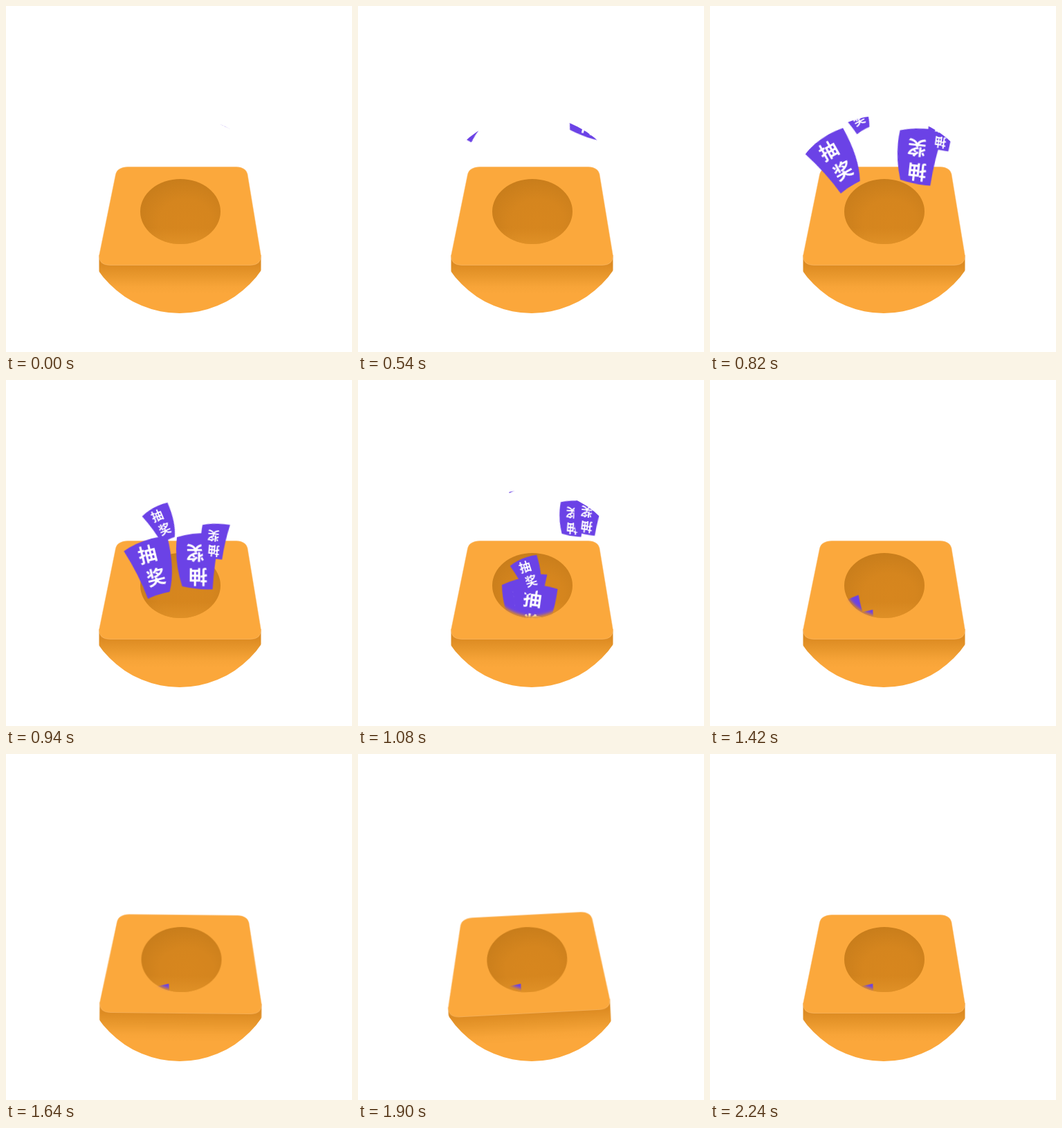
An HTML page that plays this animation: 500x500 px, repeating every 3.26 s.

```html
<!DOCTYPE html>
<html lang="zh-CN">
<head>
<meta charset="utf-8">
<title>抽奖</title>
<style>
html, body { margin: 0; width: 100%; height: 100%; overflow: hidden; background: #fff; }
svg { display: block; width: 100vw; height: 100vh; }
text {
  font: 700 27px "Noto Sans CJK SC", "Noto Sans CJK", sans-serif;
  fill: #fff;
  text-anchor: middle;
}
.box { transform-origin: 251px 444px; animation: sway 3260ms infinite; }
.fall {
  animation: 3260ms infinite;
  animation-timing-function: cubic-bezier(.333, .107, .667, .44);
}
.big { animation-name: big; }
.small { animation-name: small; }
.late { animation-name: late; }
.last { animation-name: last; }

/* Each ticket drops from pose --a to pose --b */
@keyframes big { 0%, 14.72% { transform: var(--a); } 36.2%, 100% { transform: var(--b); } }
@keyframes small { 0%, 17.18% { transform: var(--a); } 40.49%, 100% { transform: var(--b); } }
@keyframes late { 0%, 26.38% { transform: var(--a); } 44.79%, 100% { transform: var(--b); } }
@keyframes last { 0%, 32.52% { transform: var(--a); } 42.94%, 100% { transform: var(--b); } }

/* Two full sine swings */
@keyframes sway {
  0% { transform: rotate(0deg); }
  43.74% { transform: rotate(0deg); animation-timing-function: cubic-bezier(.39, .575, .565, 1); }
  46.87%, 59.39% { transform: rotate(-3.5deg); animation-timing-function: cubic-bezier(.364, 0, .636, 1); }
  53.13% { transform: rotate(3.5deg); animation-timing-function: cubic-bezier(.364, 0, .636, 1); }
  65.64% { transform: rotate(3.5deg); animation-timing-function: cubic-bezier(.47, 0, .745, .715); }
  68.71%, 100% { transform: rotate(0deg); }
}
</style>
</head>
<body>
<svg viewBox="0 0 500 500">
  <defs>
    <clipPath id="disc"><circle cx="251" cy="301" r="143"/></clipPath>
    <linearGradient id="front" gradientUnits="userSpaceOnUse" x1="0" y1="374" x2="0" y2="416">
      <stop offset="0" stop-color="#dd8b22"/>
      <stop offset=".35" stop-color="#e8972c"/>
      <stop offset=".75" stop-color="#f7a438"/>
      <stop offset="1" stop-color="#fba73b"/>
    </linearGradient>
    <radialGradient id="hollow" cx=".56" cy=".64" r=".66">
      <stop offset="0" stop-color="#d7861e"/>
      <stop offset=".5" stop-color="#d5851e"/>
      <stop offset="1" stop-color="#c87d1b"/>
    </radialGradient>
    <linearGradient id="lip" x1="0" y1="0" x2="0" y2="1">
      <stop offset=".75" stop-color="#e39429" stop-opacity="0"/>
      <stop offset="1" stop-color="#e39429" stop-opacity=".75"/>
    </linearGradient>
    <filter id="soft"><feGaussianBlur stdDeviation="2"/></filter>
    <mask id="mouth" maskUnits="userSpaceOnUse" x="0" y="0" width="500" height="500">
      <rect width="500" height="297" fill="#fff"/>
      <ellipse cx="252" cy="295" rx="57" ry="46" fill="#fff" filter="url(#soft)"/>
    </mask>
    <g id="words">
      <text x="-1" y="-12">抽</text>
      <text x="3" y="23">奖</text>
    </g>
    <g id="left">
      <path fill="#6b42e6" d="M-33-35Q-2-47 33-41Q33 8 17 38Q0 37-16 40Q-20 4-33-35Z"/>
      <use href="#words"/>
    </g>
    <g id="right">
      <path fill="#6b42e6" d="M-30-35Q-4-43 33-41Q24 0 22 40Q0 41-22 36Q-34 0-30-35Z"/>
      <use href="#words" transform="rotate(180)"/>
    </g>
  </defs>

  <g clip-path="url(#disc)">
    <g class="box">
      <path fill="url(#front)" d="M134.5 360V480H368.5V360Z"/>
      <path fill="#fba83c" stroke="#fcc27a" stroke-width=".8" stroke-opacity=".6"
        d="M176 232.5H333Q346.5 233 349 243L368.3 360Q369 374.5 353 374.5H150Q134 374.5 134.7 360L158.5 243Q161 233 176 232.5Z"/>
      <ellipse cx="252" cy="297" rx="58" ry="47" fill="url(#hollow)"/>
      <ellipse cx="252" cy="297" rx="58" ry="47" fill="url(#lip)"/>
    </g>

    <g mask="url(#mouth)">
      <g class="fall big" style="--a:translate(341px,142px) rotate(16deg); --b:translate(214px,380px) rotate(-15deg)">
        <use href="#right"/>
      </g>
      <g class="fall small" style="--a:translate(379px,116px) rotate(11deg) scale(.63); --b:translate(143px,469px) rotate(-6deg) scale(.63)">
        <use href="#right"/>
      </g>
      <g class="fall big" style="--a:translate(137px,152px) rotate(-55deg); --b:translate(283px,392px) rotate(26deg)">
        <use href="#left"/>
      </g>
      <g class="fall small" style="--a:translate(190px,90px) rotate(-33deg) scale(.63); --b:translate(294px,449px) rotate(-4deg) scale(.63)">
        <use href="#left"/>
      </g>
      <g class="fall last" style="--a:translate(218px,122px) rotate(-22deg) scale(.79); --b:translate(281px,459px) rotate(11deg) scale(.79)">
        <use href="#left"/>
      </g>
      <g class="fall late" style="--a:translate(339px,131px) rotate(11deg) scale(.64); --b:translate(203px,460px) rotate(-20deg) scale(.64)">
        <use href="#right"/>
      </g>
      <g class="fall late" style="--a:translate(370px,154px) rotate(16deg) scale(.63); --b:translate(186px,365px) rotate(-28deg) scale(.63)">
        <use href="#right"/>
      </g>
    </g>
  </g>
</svg>
</body>
</html>
```
